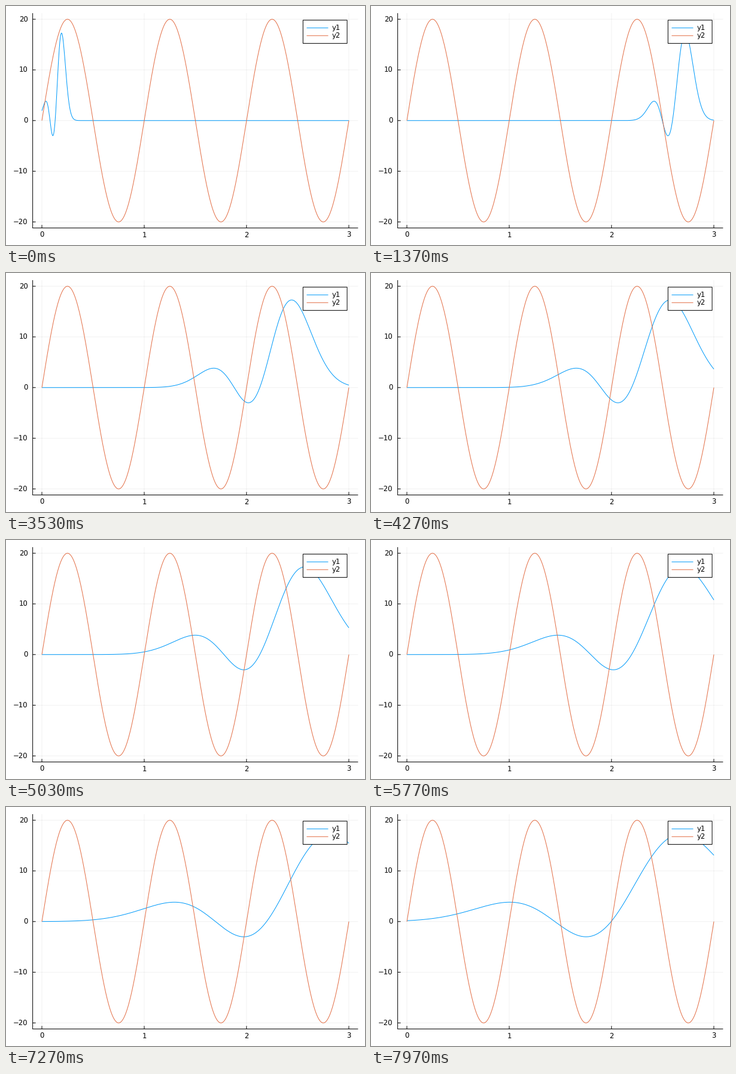
A matplotlib script for the animation above (8000 ms loop, 600x400 px).

```python
import numpy as np
import matplotlib.pyplot as plt
from matplotlib.animation import FuncAnimation
from matplotlib.patches import Rectangle

W, H, DPI = 600, 400, 100
FRAMES, LOOP_MS = 240, 8000
PX = 72 / DPI  # one pixel in points
BLUE, ORANGE = "#009afa", "#e36f47"
LEFT, RIGHT, TOP, BOTTOM = 44.6, 588.4, 12.0, 371.5

plt.rcParams.update({"font.family": "DejaVu Sans", "text.hinting": "none",
                     "path.snap": False})
fig = plt.figure(figsize=(W / DPI, H / DPI), dpi=DPI, facecolor="white")
ax = fig.add_axes([0, 0, 1, 1])
ax.set_xlim(0, W)
ax.set_ylim(H, 0)
ax.axis("off")


def to_x(x):
    return 60 + 171 * x


def to_y(y):
    return 191.75 - 8.48 * y


def stroke(xs, ys, color="black", **kw):
    return ax.plot(xs, ys, color=color, lw=PX, solid_capstyle="butt", **kw)[0]


def label(x, y, text, ha, **kw):
    ax.text(x, y, text, ha=ha, va="baseline", fontsize=11.6 * PX, color="black", **kw)


def packet(x, center, width):
    v = (x - center) / width
    return 13.43 * v * (v + 1) * np.exp(-v * v / 2)


# Grid, ticks and tick labels
for n in range(4):
    x = to_x(n)
    stroke([x, x], [TOP, BOTTOM], alpha=0.055, zorder=1)
    stroke([x, x], [BOTTOM, BOTTOM - 5], zorder=2)
    label(x, 387.2, str(n), "center")
for n in range(-20, 21, 10):
    y = to_y(n)
    stroke([LEFT, RIGHT], [y, y], alpha=0.055, zorder=1)
    stroke([LEFT, LEFT + 5], [y, y], zorder=2)
    label(36.7, y + 4.2, str(n).replace("-", "\u2212"), "right")
stroke([LEFT, LEFT], [TOP, BOTTOM + 0.5], zorder=2)
stroke([LEFT, RIGHT], [BOTTOM, BOTTOM], zorder=2)

# Curves
t = np.linspace(0, 3, 601)
wave = stroke(to_x(t), to_y(0 * t), BLUE, zorder=3)
stroke(to_x(t), to_y(20 * np.sin(2 * np.pi * t)), ORANGE, zorder=4)

# Legend
ax.add_patch(Rectangle((496.4, 23.7), 73.7, 38.9, facecolor="white",
                       edgecolor="black", lw=PX, zorder=5))
for name, color, y in (("y1", BLUE, 36.7), ("y2", ORANGE, 49.7)):
    stroke([502.5, 538.5], [y, y], color, zorder=6)
    label(544.4, y + 4.2, name, "left", zorder=6)


def update(i):
    # Each sweep has 45 half-steps; every sweep is wider than the last.
    sweep, step = divmod(2 * i + 1, 45)
    center = (step + 1) / 15 - 0.004
    wave.set_ydata(to_y(packet(t, center, 0.05 * (sweep + 1))))
    return (wave,)


anim = FuncAnimation(fig, update, frames=FRAMES, interval=LOOP_MS / FRAMES,
                     init_func=lambda: update(0), repeat=True, repeat_delay=0)
plt.show()
```
